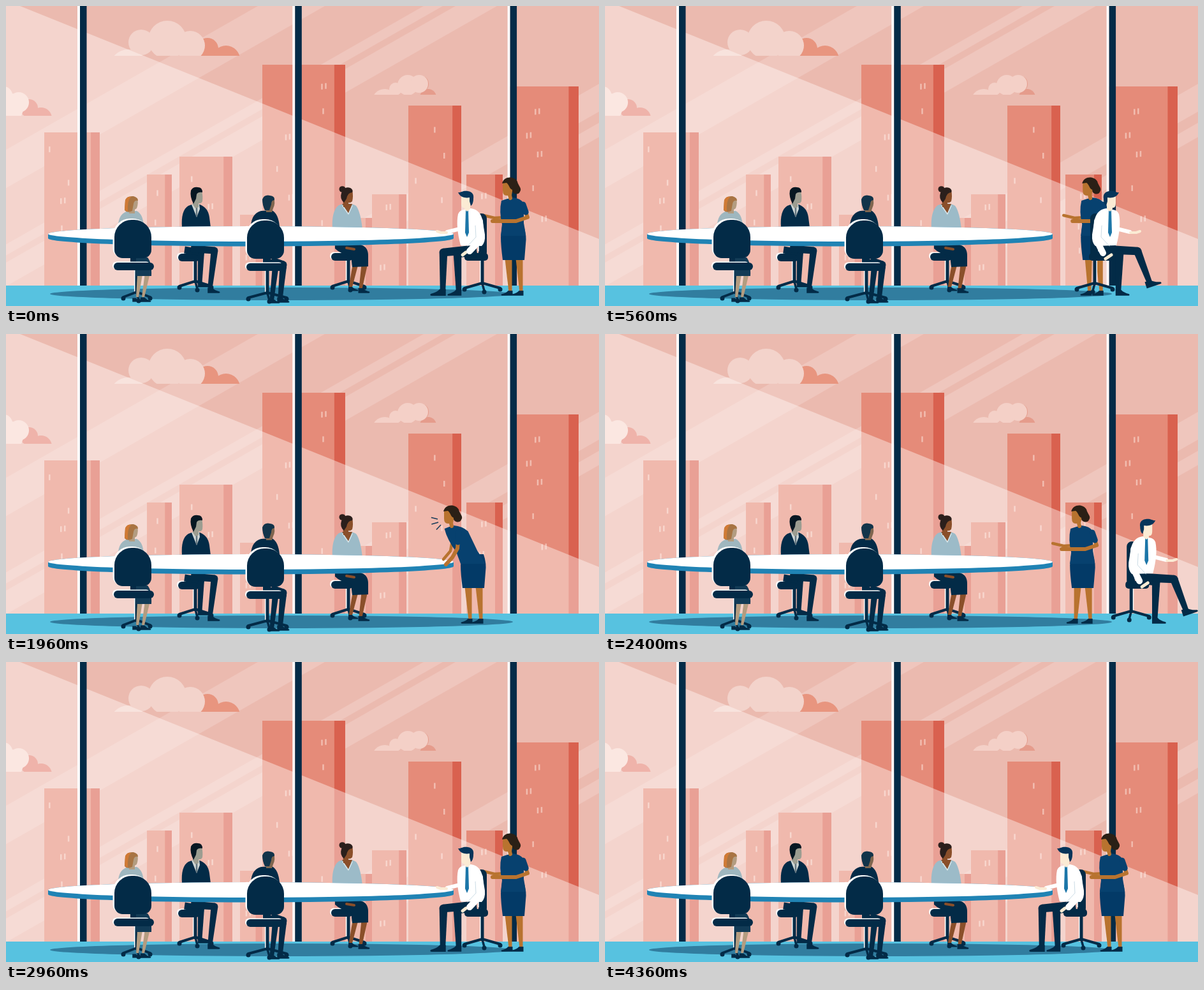
These frames come from a looping animation (930 by 470 pixels, 4560 ms). An HTML page with a canvas:

```html
<!DOCTYPE html>
<html lang="en">
<head>
<meta charset="utf-8">
<title>Meeting room</title>
<style>
html, body { margin: 0; width: 100%; height: 100%; overflow: hidden; background: #ebbaaf; }
canvas { display: block; width: 930px; height: 470px; }
</style>
</head>
<body>
<canvas id="stage"></canvas>
<script>
const W = 930, H = 470, FLOOR = 438, LOOP = 4560, STEP = 40;
const NAVY = '#032b47', WHITE = '#fff', SKIN = '#b8732f', PALE = '#fbebd4', BROWN = '#8a4f2a', BEIGE = '#b39c80';
const canvas = document.getElementById('stage');
const dpr = window.devicePixelRatio || 1;
canvas.width = W * dpr;
canvas.height = H * dpr;
const c = canvas.getContext('2d');

// ---- drawing helpers ----
function shape(d, color) {
  c.fillStyle = color;
  c.fill(new Path2D(d));
}
function rect(x, y, w, h, color) {
  c.fillStyle = color;
  c.fillRect(x, y, w, h);
}
function oval(x, y, rx, ry, color) {
  c.fillStyle = color;
  c.beginPath();
  c.ellipse(x, y, rx, ry, 0, 0, 7);
  c.fill();
}
function round(x, y, w, h, r, color) {
  c.fillStyle = color;
  c.beginPath();
  c.roundRect(x, y, w, h, r);
  c.fill();
}
function trace(p) {
  c.beginPath();
  for (let i = 0; i < p.length; i += 2) c.lineTo(p[i], p[i + 1]);
}
function line(p, width, color, cap = 'round') {
  trace(p);
  c.lineWidth = width;
  c.strokeStyle = color;
  c.lineCap = cap;
  c.lineJoin = 'round';
  c.stroke();
}
function poly(p, color) {
  trace(p);
  c.fillStyle = color;
  c.fill();
}
function limb(x0, y0, w0, x1, y1, w1, color) {
  const a = Math.atan2(y1 - y0, x1 - x0), nx = -Math.sin(a) / 2, ny = Math.cos(a) / 2;
  poly([x0 + nx * w0, y0 + ny * w0, x1 + nx * w1, y1 + ny * w1,
    x1 - nx * w1, y1 - ny * w1, x0 - nx * w0, y0 - ny * w0], color);
}
// hip, knee and ankle, thinner towards the foot
function leg(hx, hy, kx, ky, ax, ay, w, color) {
  limb(hx, hy, w, kx, ky, w * .9, color);
  oval(kx, ky, w * .45, w * .45, color);
  limb(kx, ky, w * .9, ax, ay, w * .6, color);
}
function shoe(x, y, dir, size, turn = 0) {
  c.save();
  c.translate(x, y);
  c.scale(dir * size, size);
  c.rotate(turn);
  shape('M-5 -10 L5 -10 Q9 -5 20 -2 Q22 1 18 1 L-5 1Z', NAVY);
  c.restore();
}

// ---- number helpers ----
const mix = (a, b, k) => a + (b - a) * k;
const clamp = k => Math.max(0, Math.min(1, k));
const ease = (v, from, to) => {
  const k = clamp((v - from) / (to - from));
  return k * k * (3 - 2 * k);
};
function seeded(seed) {
  return () => (seed = seed * 16807 % 2147483647) / 2147483647;
}

// ---- room ----
// left, top, width
const TOWERS = [
  [60, 198, 87], [221, 264, 39], [272, 236, 83], [367, 327, 35], [402, 92, 130],
  [532, 332, 43], [574, 295, 54], [631, 156, 83], [722, 264, 57], [790, 126, 108]
];

function towers() {
  const random = seeded(71);
  for (const [x, y, w] of TOWERS) {
    const side = 8 + w * .07, rows = Math.round(w / 20);
    rect(x, y, w, FLOOR - y, '#e58b79');
    rect(x + w - side, y, side, FLOOR - y, '#d9614f');
    for (let i = 0; i < rows; i++) {
      const px = x + 7 + random() * (w - side - 20);
      const py = y + 15 + (i + random() * .5) * 42;
      rect(px, py, 2.5, 9, '#f2bdb0');
      if (random() < .5) rect(px + 6, py - 1, 2.5, 9, '#f2bdb0');
    }
  }
}
// circles cut off at the base line
function cloud(base, color, ...puffs) {
  c.save();
  c.beginPath();
  c.rect(0, 0, W, base);
  c.clip();
  for (const [x, y, r] of puffs) oval(x, y, r, r, color);
  c.restore();
}
function room() {
  rect(0, 0, W, FLOOR, '#ebbaaf');
  // reflections: left edge and width along the top
  for (const [x, w] of [[395, 105], [655, 30], [705, 65], [1144, 76], [1251, 39]])
    poly([x, 0, x + w, 0, x + w - 768, FLOOR, x - 768, FLOOR], 'rgba(255,246,242,.2)');
  towers();

  cloud(78, '#e8957f', [316, 67, 17], [345, 84, 22]);
  cloud(78, '#f3d3cb', [192, 98, 30], [212, 57, 20], [253, 53, 30], [289, 62, 23]);
  cloud(139, '#e59c8c', [650, 122, 13], [662, 143, 13]);
  cloud(139, '#f4d0c7', [594, 150, 20], [611, 130, 10], [630, 124, 16], [648, 122, 14]);
  cloud(172, '#e28073', [36, 160, 14], [55, 176, 17]);
  cloud(172, '#f8dad2', [-4, 140, 14], [20, 151, 16], [3, 160, 24]);

  poly([0, 0, 22, 0, W, 365, W, FLOOR, 0, FLOOR], 'rgba(255,248,245,.42)');

  for (let i = 0; i < 3; i++) {
    const x = 112 + i * 337.3;
    rect(x, 0, 4, FLOOR + 1, WHITE);
    rect(x + 4, 0, 10.5, FLOOR + 1, NAVY);
  }
  rect(0, FLOOR, W, H - FLOOR, '#57c2e0');
  oval(432, 451, 363, 10, '#317d9f');
}

function table() {
  c.fillStyle = '#2083b4';
  c.beginPath();
  c.ellipse(384, 357, 318, 12, 0, Math.PI, 0);
  c.ellipse(384, 364, 318, 12.5, 0, 0, Math.PI);
  c.fill();
  oval(384, 357, 318, 12, WHITE);
}

// ---- chairs ----
function base(x, y, half, top) {
  line([x - 3, top, x - 3, y - 9], 2, WHITE, 'butt');
  line([x, top, x, y - 6], 5, NAVY, 'butt');
  line([x - half, y - 1, x, y - 9, x + half, y - 1], 4, NAVY);
  line([x, y - 8, x + 3, y + 3], 3.5, NAVY);
  for (const [dx, dy] of [[-half, 1], [half, 1], [3, 5]]) oval(x + dx, y + dy, 3.5, 3.5, NAVY);
}
function seat(x, y, w) {
  round(x - 2, y - 1.5, w - 4, 12, 6, WHITE);
  round(x, y, w, 12, 6, NAVY);
}
function chairBack(x, y) {
  const r = [27, 27, 13, 13];
  round(x - 2.5, y - 2, 58, 60, r, WHITE);
  round(x, y, 58, 60, r, NAVY);
  rect(x + 25, y + 58, 9, 12, NAVY);
  seat(x - 1, y + 67, 63);
}

// ---- far side of the table ----
function suitMan() {
  base(297, 440, 25, 396);
  seat(270, 388, 34);
  leg(280, 382, 306, 386, 304, 436, 11, NAVY);
  leg(290, 380, 327, 383, 320, 442, 12, NAVY);
  shoe(304, 440, 1, .65);
  shoe(320, 449, 1, .75);
  shape('M276 347 Q274 320 286 313 Q294 309 304 311 Q317 316 319 331 L321 347Z', NAVY);
  shape('M291 311 L303 310 L304 318 L299 331Z', '#cfd6d5');
  line([299, 315, 299, 329], 2.5, '#647680');
  shape('M293 294 L307 290 Q309 297 308 306 Q306 310 302 309 L302 315 L297 317 L293 311Z', '#9c9d91');
  shape('M290 289 Q293 283 301 284 Q308 284 308 292 Q301 291 299 295 L298 302 L294 310 Q288 298 290 289Z', '#071722');
}
function bunWoman() {
  base(537, 440, 25, 396);
  seat(510, 387, 34);
  limb(549, 400, 9, 540, 442, 5, BROWN);
  limb(563, 400, 10, 556, 443, 5, BROWN);
  shape('M516 374 L556 374 Q568 377 568 391 L568 408 L543 409 L541 391 Q525 389 516 380Z', NAVY);
  line([534, 379, 546, 381], 4, BROWN);
  shoe(540, 446, 1, .6);
  shoe(556, 449, 1, .7);
  shape('M512 350 Q510 321 522 312 Q536 306 549 313 Q556 322 559 350Z', '#9cbbc8');
  shape('M527 310 L543 310 L537 325Z', BROWN);
  line([528, 313, 537, 326, 543, 313], 1.5, '#d7e4e8');
  shape('M528 292 L543 288 Q545 298 543 306 Q540 309 537 308 L537 315 L529 315Z', BROWN);
  oval(527.5, 287, 5, 4.8, '#2b1f1c');
  shape('M526 293 Q530 282 540 285 Q545 288 543 292 Q536 292 534 302 L530 308 Q523 302 526 293Z', '#2b1f1c');
}

// ---- near side of the table ----
function bobWoman() {
  shape('M176 345 Q176 327 189 322 L205 321 Q215 326 216 345Z', '#9fb7bf');
  shape('M191 302 L206 301 Q208 309 205 317 L202 319 L202 325 L193 325Z', BEIGE);
  shape('M187 304 Q190 297 200 298 Q207 300 207 305 Q201 304 200 310 L198 321 Q190 325 186 320Z', '#a87443');
  shape('M187 304 Q190 298 196 299 Q190 305 191 322 Q188 322 186 319Z', '#d07a35');
  base(205, 457, 21, 413);
  limb(210, 420, 8, 206, 456, 4, BEIGE);
  limb(222, 418, 8, 215, 456, 4, BEIGE);
  shape('M201 394 L222 394 Q229 402 228 423 L204 423Z', '#123b56');
  shoe(201, 463, 1, .55);
  shoe(214, 463, 1, .65);
  chairBack(170, 335);
}
function backMan() {
  shape('M384 345 Q385 325 400 321 L417 320 Q427 325 429 345Z', NAVY);
  shape('M408 301 L420 300 Q423 309 419 317 L417 323 L408 323Z', '#80664f');
  shape('M402 303 Q405 295 414 297 Q422 298 421 304 Q416 304 416 311 L413 320 L406 320 Q402 312 402 303Z', '#12344a');
  base(410, 458, 30, 413);
  leg(410, 400, 423, 406, 417, 459, 11, NAVY);
  leg(416, 399, 435, 405, 430, 459, 12, NAVY);
  shoe(416, 465, 1, .65);
  shoe(429, 464, 1, .75);
  chairBack(378, 336);
}

// ---- the two who move ----
function woman(dx, lean) {
  const dress = '#07416f', slant = .48, hip = 360;
  const reach = (x, y, u, v) => [mix(x + dx, u, lean), mix(y, v, lean)];
  const shoulder = [811 + dx - 38 * lean, 311];

  line([...reach(783, 331, 701, 318), ...reach(766, 332, 697, 340), ...reach(749, 328, 686, 353)], 4.5, SKIN);
  const stride = -7 * Math.max(0, Math.sin(dx * Math.PI / 28)) * (1 - lean);
  for (const [x, swing] of [[788, stride], [805, 0]]) {
    limb(x + dx, 396, 11, x + 3 + dx + swing, 448, 5, SKIN);
    shoe(x + 3 + dx + swing, 453, -1, .7);
  }

  c.save();
  c.translate(dx, 0);
  shape('M778 345 L812 345 Q817 360 815 373 L813 398 L779 398 Q776 375 776 362Z', '#033a67');
  c.transform(1, 0, slant * lean, 1, -slant * lean * hip, 0);
  shape('M777 305 Q785 302 794 300 Q807 301 812 309 L812 340 Q814 350 815 360 L776 360 L778 342 Q773 322 777 305Z', dress);
  c.restore();

  const elbow = reach(818, 331, 708, 336);
  line([...shoulder, ...elbow, ...reach(800, 337, 700, 350), ...reach(763, 337, 690, 361)], 6, SKIN);
  line([...shoulder, mix(shoulder[0], elbow[0], .6), mix(shoulder[1], elbow[1], .6)], 9, dress);

  c.save();
  c.translate(dx - 29 * lean, 0);
  line([789, 292, 791, 301], 6, SKIN);
  shape('M779 278 Q780 272 787 272 L795 284 L793 297 L785 297 Q779 297 779 289Z', SKIN);
  shape('M778 278 C781 266 797 266 802 275 C803 281 810 286 806 291 C804 297 793 295 794 288 C789 286 790 281 785 277Z', '#2b2016');
  c.restore();
}

function man(x, turn, kick) {
  const ankleX = mix(685, 661, kick), ankleY = mix(446, 433, kick);
  c.save();
  c.translate(x, 0);
  c.scale(turn, 1);
  c.translate(-747, 0);
  round(741, 325, 13, 65, [4, 8, 4, 4], NAVY);
  line([741, 331, 741, 384], 1.5, WHITE);
  base(747, 443, 28, 397);
  round(719, 387, 37, 12, 5, NAVY);
  leg(738, 381, mix(686, 680, kick), mix(386, 384, kick), ankleX, ankleY, 14, NAVY);
  shoe(ankleX, ankleY + 7, -1, .95, -.32 * kick);
  leg(738, 384, 708, 388, 710, 446, 14, NAVY);
  shoe(710, 453, -1, .85);
  line([712, 349, 692, 354], 6, WHITE);
  line([691, 355, 682, 355, 676, 353], 4, PALE);
  shape('M719 319 L729 317 Q743 319 747 334 L751 358 Q752 370 746 376 L713 375 Q705 345 709 326 Q711 320 719 319Z', WHITE);
  shape('M721 320 L725 320 L726 355 L723 362 L720 355Z', '#1c76a8');
  line([721, mix(386, 390, kick), mix(716, 730, kick), mix(390, 396, kick)], 5, PALE);
  line([743, 337, 745, 365, mix(727, 734, kick), mix(384, 387, kick)], 10, WHITE);
  line([736, 344, 737, 362, 724, 376], 1, '#cbdce5');
  shape('M714 297 L729 297 L728 312 L728 318 L723 322 L719 318 L719 316 Q714 317 714 309Z', PALE);
  shape('M709 292 C713 293 716 289 724 290 C732 291 734 296 733 302 C733 308 731 312 729 313 L727 306 L727 300 C722 301 713 301 709 292Z', '#05355a');
  c.restore();
}

// three strokes that shoot out of the mouth and vanish from the inside
function speech(dx, dy, p) {
  const from = clamp((p - .4) / .6), to = clamp(p / .44);
  if (to <= from) return;
  for (const [x, y, u, v] of [[677, 290, 657, 285], [678, 295, 657, 301], [682, 299, 668, 314]])
    line([mix(x, u, from) + dx, mix(y, v, from) + dy, mix(x, u, to) + dx, mix(y, v, to) + dy], 1.5, '#173b59', 'butt');
}

// progress of the swap of places: out at an even pace, back with a fast start
const SWAP = 1080;
function progress(t) {
  if (t < 2240) return Math.min(Math.max(t - 40, 0), SWAP);
  return SWAP * Math.max(0, (2960 - t) / 720) ** 1.6;
}

function draw(t) {
  c.setTransform(dpr, 0, 0, dpr, 0, 0);
  room();
  suitMan();
  bunWoman();
  table();
  bobWoman();
  backMan();
  const s = progress(t);
  woman(-63 * ease(s, 0, SWAP), ease(s, 840, SWAP));
  man(747 + 21 * (s / 520) ** 4, 1 - 2 * ease(s, 40, 400), ease(s, 300, 520));
  if (t >= 1160 && t < 2240) speech(0, 0, (t - 1160) % 360 / 360);
  for (const start of [3360, 4000])
    if (t > start && t < start + 360) speech(24, 18, (t - start) / 360);
}

const begin = performance.now();
let last = -1;
function tick() {
  const t = Math.floor((performance.now() - begin) % LOOP / STEP) * STEP;
  if (t !== last) draw(last = t);
  requestAnimationFrame(tick);
}
tick();
</script>
</body>
</html>
```
